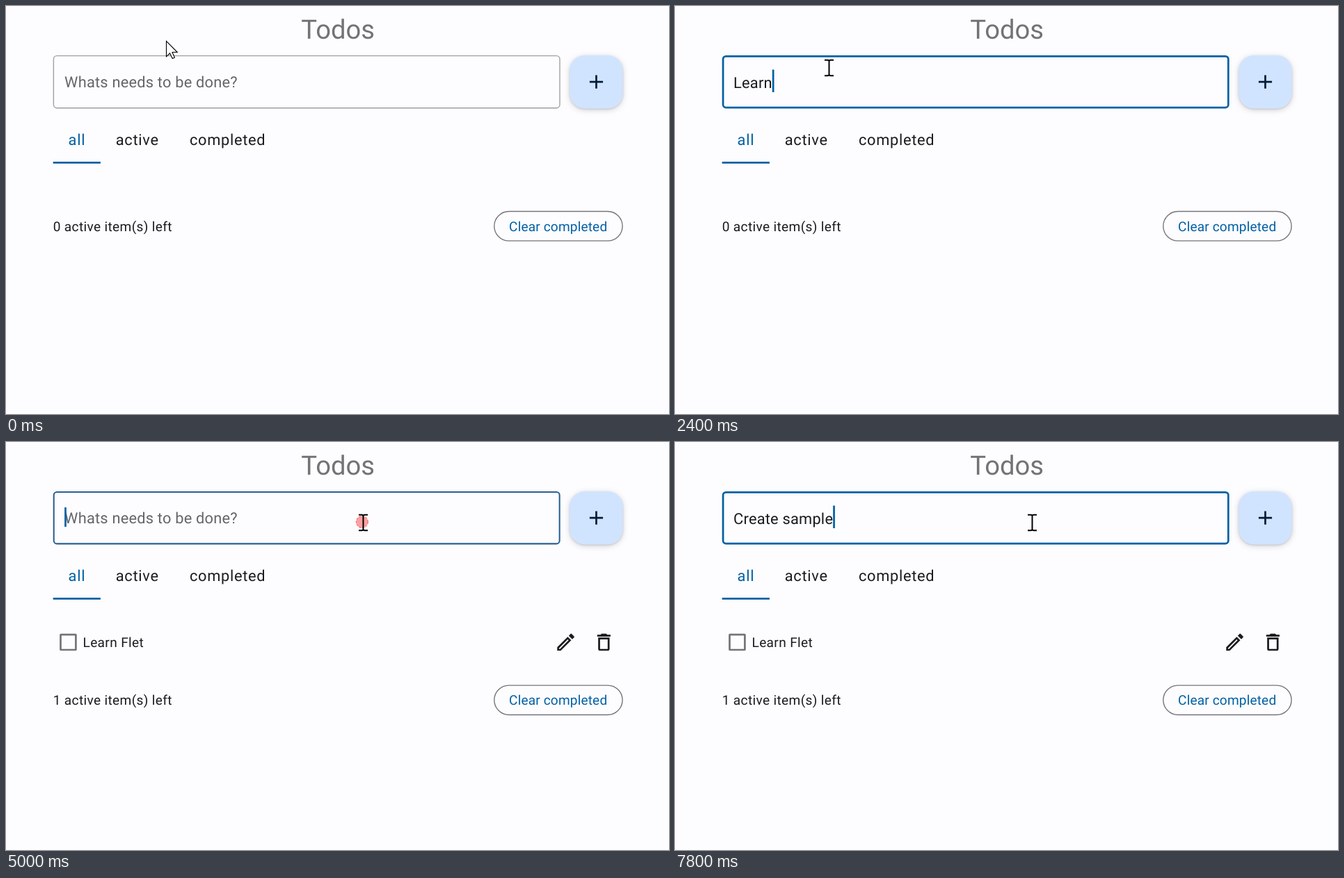
An HTML page for the animation above (8000 ms loop, 953x587 px).

```html
<!DOCTYPE html>
<html lang="en">
<head>
<meta charset="utf-8">
<title>Todos</title>
<style>
  html, body { margin: 0; width: 100%; height: 100%; overflow: hidden; background: #fdfcff; }
  svg { display: block; width: 953px; height: 587px; }
  text { font: 21.84px Roboto, sans-serif; fill: #1a1c1e; white-space: pre; text-rendering: geometricPrecision; }
  .title { font-size: 38.22px; fill: #737275; text-anchor: middle; }
  .field { letter-spacing: .205px; }
  .hint { fill: #666568; }
  .tab { letter-spacing: .683px; }
  .body { font-size: 19.11px; letter-spacing: .341px; }
  .button { font-size: 19.11px; letter-spacing: .137px; text-anchor: middle; }
  .blue { fill: #0061a4; }
  .fab { fill: #d1e4ff; filter: drop-shadow(0 1.5px 1.5px rgba(0,0,0,.12)) drop-shadow(0 2px 4px rgba(0,0,0,.17)); }
</style>
</head>
<body>
<svg viewBox="0 0 953 587">
  <rect width="953" height="587" fill="#fdfcff"/>
  <text class="title" x="477.2" y="46.8">Todos</text>

  <rect id="border" fill="none"/>
  <text id="hint" class="field hint" x="84.1" y="117">Whats needs to be done?</text>
  <text id="typed" class="field" x="84.1" y="117.8"></text>
  <rect id="caret" class="blue" width="2.73" rx=".6"/>

  <rect class="fab" x="810.3" y="71" width="76.4" height="76.4" rx="21.8"/>
  <path d="M838.9 109.2h19.2M848.5 99.6v19.2" stroke="#001d36" stroke-width="2.73"/>

  <text class="tab blue" x="89.6" y="199.5">all</text>
  <text class="tab" x="157.8" y="199.5">active</text>
  <text class="tab" x="263.9" y="199.5">completed</text>
  <rect class="blue" x="67.7" y="224" width="68.2" height="2.73"/>

  <g id="item">
    <rect x="78.5" y="277.1" width="21.9" height="21.9" rx=".5" fill="none" stroke="#757477" stroke-width="2.73"/>
    <text class="body" x="110.5" y="295">Learn Flet</text>
    <g fill="#1a1c1e">
      <path transform="translate(788.2 271.7) scale(1.365)" d="M14.06 9.02l.92.92L5.92 19H5v-.92l9.06-9.06M17.66 3c-.25 0-.51.1-.7.29l-1.83 1.83 3.75 3.75 1.83-1.83c.39-.39.39-1.02 0-1.41l-2.34-2.34c-.2-.2-.45-.29-.71-.29zm-3.6 3.19L3 17.25V21h3.75L17.81 9.94l-3.75-3.75z"/>
      <path transform="translate(843 271.7) scale(1.365)" d="M6 19c0 1.1.9 2 2 2h8c1.1 0 2-.9 2-2V7H6v12zM8 9h8v10H8V9zm7.5-5l-1-1h-5l-1 1H5v2h14V4h-3.5z"/>
    </g>
  </g>

  <g id="footer">
    <text id="count" class="body" x="67.7" y="323.6"></text>
    <rect x="701.8" y="295.5" width="184.3" height="42.4" rx="21.2" fill="none" stroke="#74747a" stroke-width="1.365"/>
    <text class="button blue" x="793.7" y="323.6">Clear completed</text>
  </g>

  <circle id="ring" stroke-dasharray="3 2"/>
  <path id="arrow" d="M.5 .5V22.8L5.5 18 9.2 25.6 12.4 24.2 9 16.5H16.3Z" fill="#fff" stroke="#000" stroke-width="1.1"/>
  <path id="beam" d="M-6.5-11.3h4.3q2.2 0 2.2 2v18.6q0 2-2.2 2h-4.3M6.5-11.3H2.2q-2.2 0-2.2 2M0 9.3q0 2 2.2 2h4.3" fill="none" stroke="#000" stroke-width="2"/>
</svg>
<script>
const LOOP = 8000, LEFT = 84.1;
const $ = id => document.getElementById(id);
const set = (node, attrs) => { for (const k in attrs) node.setAttribute(k, attrs[k]); };

// border style: [stroke width, colour]
const BORDERS = {
  idle: [1.365, '#9f9ea1'],
  hover: [1.365, '#3c3c3f'],
  turning: [2.05, '#2a618f'],
  focus: [2.73, '#0061a4']
};
// click ring: [radius, fill opacity, stroke opacity]
const RINGS = [null, [8.5, .42, .75], [12.5, .24, .4], [15.7, .1, .2]];

// Each step changes only the listed properties.
const STEPS = [
  [0, { border: 'idle', text: '', caret: false, items: 0, ring: 0, cursor: 'arrow', at: [230, 50] }],
  [400, { border: 'hover', cursor: 'beam', at: [221.5, 89] }],
  [600, { border: 'turning', caret: true, ring: 1 }],
  [800, { border: 'focus', ring: 2 }],
  [1000, { ring: 3 }],
  [1200, { ring: 0 }],
  [1600, { text: 'L' }],
  [1800, { text: 'Le' }],
  [2000, { text: 'Lea' }],
  [2400, { text: 'Learn' }],
  [2600, { text: 'Learn ' }],
  [3000, { text: 'Learn F' }],
  [3200, { text: 'Learn Fle' }],
  [3400, { text: 'Learn Flet' }],
  [3800, { caret: false, at: [231.7, 89] }],
  [4000, { caret: true, at: [590, 104] }],
  [4200, { cursor: 'arrow', at: [846, 113] }],
  [4400, { border: 'idle', caret: false, ring: 1 }],
  [4600, { text: '', items: 1, ring: 3 }],
  [4800, { border: 'hover', ring: 0, cursor: 'beam', at: [513.5, 116] }],
  [5000, { border: 'turning', caret: true, ring: 1 }],
  [5200, { border: 'focus', ring: 2 }],
  [5400, { ring: 3 }],
  [5600, { ring: 0 }],
  [6000, { text: 'C' }],
  [6200, { text: 'Cre' }],
  [6400, { text: 'Creat' }],
  [6600, { text: 'Create' }],
  [6800, { text: 'Create ' }],
  [7200, { text: 'Create s' }],
  [7400, { text: 'Create sa' }],
  [7600, { text: 'Create samp' }],
  [7800, { text: 'Create sample' }]
];

function show(id, on) { $(id).style.display = on ? '' : 'none'; }

function drawField(s) {
  const [w, color] = BORDERS[s.border];
  set($('border'), {
    x: 67.7 + w / 2, y: 71 + w / 2, width: 729 - w, height: 76.4 - w,
    rx: 5.46 - w / 2, stroke: color, 'stroke-width': w
  });
  $('typed').textContent = s.text;
  show('hint', !s.text);
  show('caret', s.caret);
  const x = LEFT + (s.text ? $('typed').getComputedTextLength() : 0);
  set($('caret'), s.text ? { x, y: 91.6, height: 32.4 } : { x, y: 94, height: 28 });
}

function drawPointer(s) {
  const [x, y] = s.at;
  for (const id of ['arrow', 'beam']) show(id, id === s.cursor);
  set($(s.cursor), { transform: `translate(${x} ${y})` });
  const ring = RINGS[s.ring];
  show('ring', ring);
  if (!ring) return;
  const [r, fill, line] = ring;
  set($('ring'), {
    cx: x - 1.7, cy: y - 1, r,
    fill: `rgba(255,30,30,${fill})`, stroke: `rgba(220,50,50,${line})`
  });
}

function draw(s) {
  drawField(s);
  show('item', s.items);
  set($('footer'), { transform: `translate(0 ${s.items * 54.6})` });
  $('count').textContent = `${s.items} active item(s) left`;
  drawPointer(s);
}

let last = -1;
const start = performance.now();
function tick() {
  const t = Math.max(0, performance.now() - start) % LOOP;
  const done = STEPS.filter(([at]) => at <= t);
  if (done.length !== last) {
    last = done.length;
    draw(Object.assign({}, ...done.map(step => step[1])));
  }
  requestAnimationFrame(tick);
}
tick();
</script>
</body>
</html>
```
